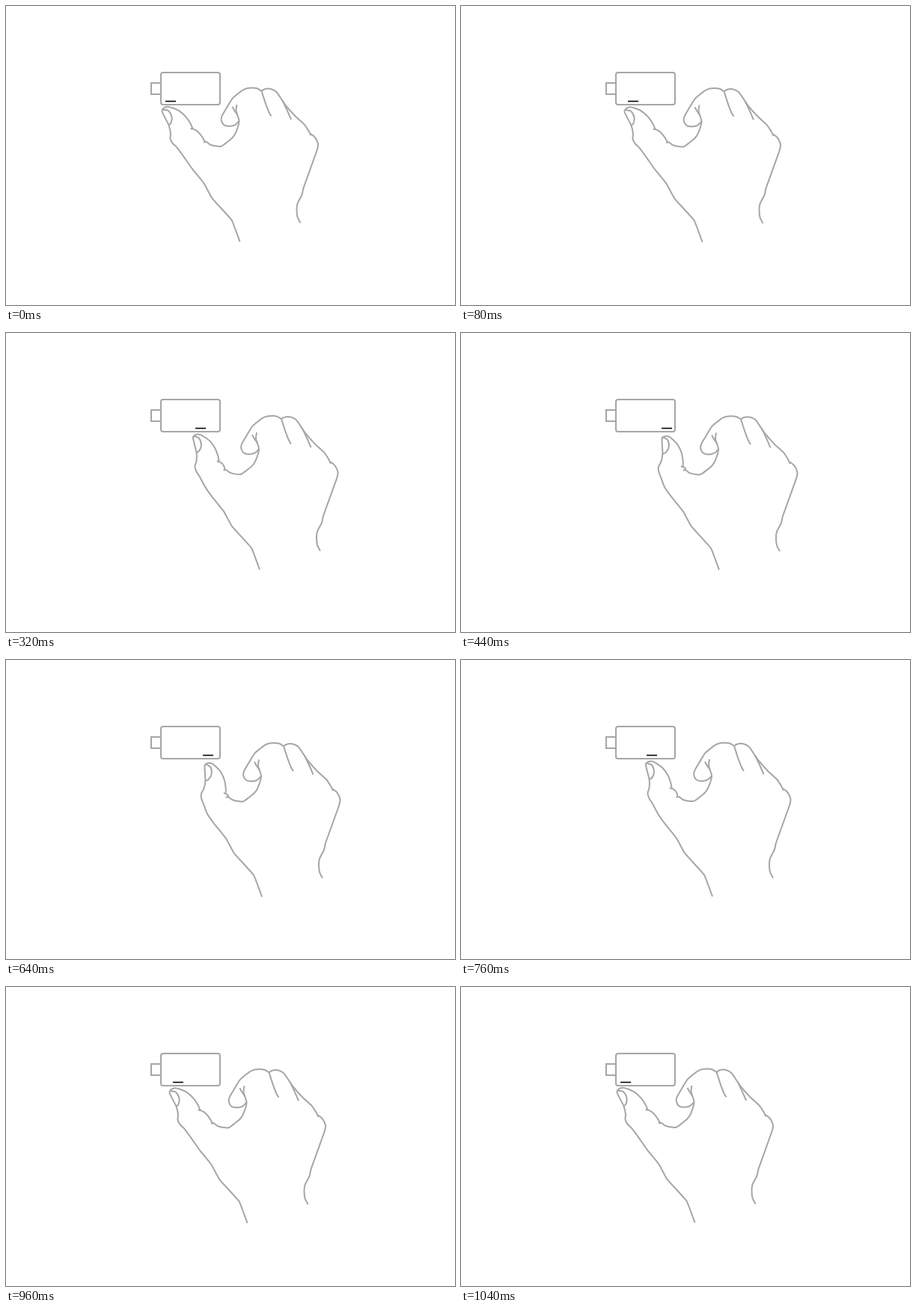
Write an HTML page with a canvas that moves like this. It is 600 px wide and 400 px high and loops after 1080 ms.

```html
<!DOCTYPE html>
<html lang="en">
<head>
<meta charset="utf-8">
<title>Thumb swipe</title>
<style>
html, body { margin: 0; width: 100%; height: 100%; overflow: hidden; background: #fff; }
canvas { display: block; }
</style>
</head>
<body>
<canvas id="stage" width="600" height="400"></canvas>
<script>
const ctx = document.getElementById('stage').getContext('2d');
const LOOP = 1080, STEP = 40, LAST = 11;
const GREY = '#a6a6a6';
const JOINT = [225, 205];
const BEND = 24 * Math.PI / 180;

const points = text => text.split(' ').map(p => p.split(',').map(Number));

const wrist = points('312,315 301,286 275,257 264,237 248,217 239,204');
const thumb = points('228,189 222,183 219,177 219.5,170 217,159 208,141 209.5,137 215,134.5 222,136 231,140 240,148 246,157 249,164');
const nail = points('209,138.5 216,139.5 221,148 220,156 217,159');
const crease = points('246,164 256,163');
const palm = [
  // web and index finger
  '263.5,182 267,181.5 273,185.5 283,187.5 288,187 302,176 307,168 311,153.5 307,140 308,131.5',
  '302,134.5 305,140 309,145.5',
  '311,153.5 306,158.5 299,160.5 291,159 287.3,153 288,147 294,136.5 302,123.5 310,116.5 318,111 327,109.3 335,110 341,113.5',
  // folded fingers
  '341,113.5 346,129 351,142 354,147',
  '341,113.5 344,111.5 350,110.3 357,112 362,116 372,131 386,147 398,158 404,167 407,173',
  '369,126 376,141 380.5,151.5',
  // outer edge
  '406,170.5 411,174 414.5,179 416.5,185 415,193 397,243 395,252 389,264 388,272 389,282 393,290'
].map(points);

// Smooth between close points, nearly sharp where long strokes meet
function stroke(pts) {
  const handle = (i, j) => {
    const p = pts[i], a = pts[i - 1] || p, b = pts[i + 1] || p;
    const len = Math.hypot(pts[j][0] - p[0], pts[j][1] - p[1]);
    const reach = Math.sign(j - i) * Math.min(len * 0.3, 3) / Math.hypot(b[0] - a[0], b[1] - a[1]);
    return [p[0] + (b[0] - a[0]) * reach, p[1] + (b[1] - a[1]) * reach];
  };
  ctx.beginPath();
  ctx.moveTo(...pts[0]);
  for (let i = 1; i < pts.length; i++) {
    ctx.bezierCurveTo(...handle(i - 1, i), ...handle(i, i - 1), ...pts[i]);
  }
  ctx.stroke();
}

function turn(pts, angle) {
  const c = Math.cos(angle), s = Math.sin(angle), [jx, jy] = JOINT;
  return pts.map(([x, y]) => [
    jx + (x - jx) * c - (y - jy) * s,
    jy + (x - jx) * s + (y - jy) * c
  ]);
}

function drawDevice(s) {
  ctx.strokeStyle = GREY;
  ctx.lineWidth = 2;
  ctx.strokeRect(194, 103, 13, 15);
  ctx.beginPath();
  ctx.roundRect(207, 89, 79, 43, 3);
  ctx.stroke();

  ctx.strokeStyle = '#000';
  ctx.lineWidth = 1.6;
  ctx.beginPath();
  ctx.moveTo(213 + s * 5, 127.5);
  ctx.lineTo(227 + s * 5, 127.5);
  ctx.stroke();
}

function drawHand(s) {
  // The thumb bends on every third step, while the hand pauses
  const pose = Math.floor(s / 3);
  const moves = s - pose;
  const dx = Math.min(5 * moves, 8.5 + 3 * moves);
  const angle = BEND * (pose / 3) ** 1.5;

  ctx.save();
  ctx.translate(dx + 0.5, dx * 0.05 + 0.3);
  ctx.strokeStyle = GREY;
  ctx.lineWidth = 2;
  ctx.lineJoin = 'round';
  palm.forEach(stroke);
  stroke([...wrist, ...turn(thumb, angle)]);
  stroke(turn(nail, angle));

  const [start, control] = turn(crease, angle);
  ctx.beginPath();
  ctx.moveTo(...start);
  ctx.quadraticCurveTo(...control, 265.5, 181.5);
  ctx.stroke();
  ctx.restore();
}

function draw(now) {
  const i = Math.floor((now % LOOP) / STEP);
  const s = Math.min(i, 26 - i, LAST);
  ctx.fillStyle = '#fff';
  ctx.fillRect(0, 0, 600, 400);
  drawDevice(s);
  drawHand(s);
}

function tick() {
  draw(performance.now());
  requestAnimationFrame(tick);
}
tick();
</script>
</body>
</html>
```
